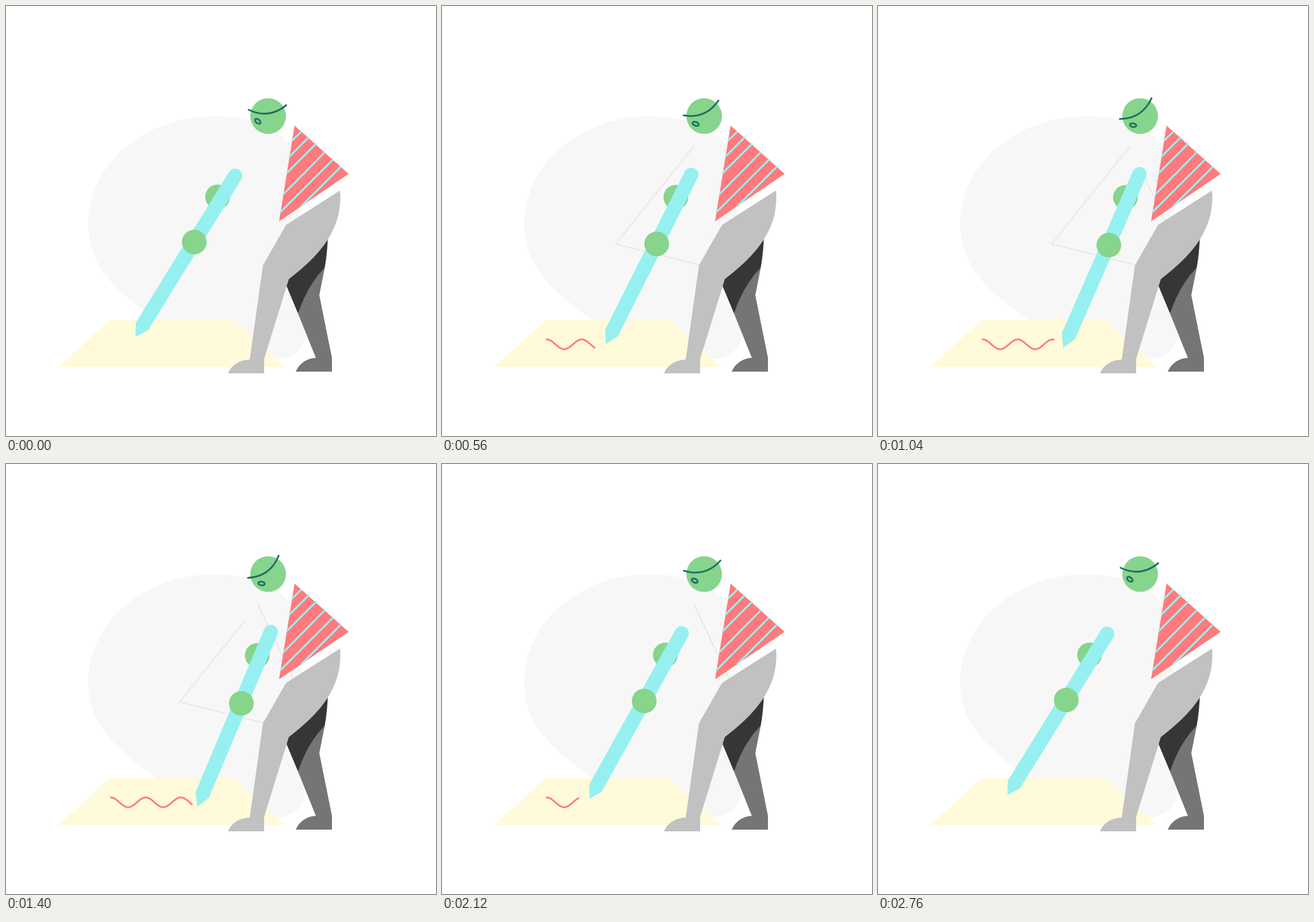
An HTML page that plays this animation: 748x748 px, repeating every 2800 ms.

```html
<!DOCTYPE html>
<html lang="en">
<head>
<meta charset="utf-8">
<title>Giant pencil</title>
<style>
  html, body { margin: 0; width: 100%; height: 100%; overflow: hidden; background: #fff; }
  svg { display: block; width: 100%; height: 100%; }
  .skin { fill: #87d48c; }
  .face { fill: none; stroke: #1f7060; stroke-width: 3; stroke-linecap: round; }
</style>
</head>
<body>
<svg viewBox="0 0 748 748">
  <path fill="#f7f7f7" d="M143 380C143 275 240 192 360 192C440 192 494 220 506 270C518 330 514 440 520 570C521 595 500 613 472 614C400 612 320 590 262 547C200 500 143 460 143 380Z"/>
  <path fill="#fffad9" d="M91 628L180 546.5H397L485 628Z"/>
  <path id="outline" fill="none" stroke="#e5e5e5" stroke-width="1.7" pathLength="1" d="M438 244L302 414L548 475Z"/>

  <!-- legs -->
  <path fill="#757575" d="M554.5 455L545 503L567 612V636H504C510 622 523 613 539 612L508 535L530 455Z"/>
  <path fill="#363636" d="M560 400Q559 430 554.5 455Q524 486 508 535L488 487L492 470L550 400Z"/>
  <path fill="#c1c1c1" d="M581 321L487 381L447 451L424 615C405 616 392 625 386 639H449V614L492 475C532 444 588 396 581 321Z"/>

  <!-- shirt -->
  <path fill="#ff7a7d" d="M502 208L596 292L475 374.5Z"/>
  <path stroke="#99eff0" stroke-width="3.2" d="M498 234L514 218M493 262L527 228M488 291L540 239M483 327L555 254M477 359L569 267M513 349L583 279"/>

  <!-- head -->
  <circle class="skin" cx="456" cy="191.5" r="31"/>
  <g id="face" class="face">
    <path d="M422 180.5Q457 197.5 487.5 172.5"/>
    <ellipse cx="438" cy="200.5" rx="5.6" ry="3.2" transform="rotate(36 438 200.5)"/>
  </g>

  <path id="wave" fill="none" stroke="#ff7a7d" stroke-width="3" stroke-linecap="round" stroke-linejoin="round"/>
  <circle id="backHand" class="skin" r="21.5"/>
  <path id="pencil" fill="#96f0f0" d="M-12.5 0A12.5 12.5 0 0 1 12.5 0V308L0 329.5L-12.5 308Z"/>
  <circle id="frontHand" class="skin" r="21.5"/>
</svg>
<script>
const LOOP = 2800;
const get = id => document.getElementById(id);
const [outline, face, wave, backHand, pencil, frontHand] =
  ['outline', 'face', 'wave', 'backHand', 'pencil', 'frontHand'].map(get);
const clamp = x => Math.min(1, Math.max(0, x));

// cubic-bezier(0, 0, .58, 1)
function easeOut(x) {
  let low = 0, high = 1;
  for (let i = 0; i < 24; i++) {
    const s = (low + high) / 2;
    if (1.74 * s * s * (1 - s) + s ** 3 < x) low = s; else high = s;
  }
  return low * low * (3 - 2 * low);
}

const sineOut = x => Math.sin(clamp(x) * Math.PI / 2);

function wavePath(end) {
  let d = '';
  for (let x = 182; x < end + 1; x++) {
    const px = Math.min(x, end);
    const py = 588.5 - 8.5 * Math.cos(Math.PI * (px - 182) / 30.5);
    d += (d ? 'L' : 'M') + px.toFixed(2) + ' ' + py.toFixed(2);
  }
  return d;
}

function place(node, x, y, angle = 0) {
  node.setAttribute('transform', `translate(${x} ${y}) rotate(${angle})`);
}

function draw(t) {
  const p = t < 1390 ? easeOut(clamp((t - 20) / 1400)) : 1 - easeOut(clamp((t - 1390) / 1400));

  place(pencil, 398.5 + 63 * p, 295.5 - 3.3 * p, 31.75 - 9.05 * p);
  place(backHand, 368 + 70 * p, 332 + p);
  place(frontHand, 327.5 + 83 * p, 410.5 + 6 * p);
  face.setAttribute('transform', `rotate(${-29.3 * p} 455.5 191.5)`);

  // the ink runs ahead early and catches up with the tip at the end
  const ink = p + 1.3 * p * (1 - p) * (0.63 - p);
  wave.setAttribute('d', ink > 0.005 ? wavePath(182 + 144 * ink) : '');

  // the outline is drawn in, then wiped from its start
  const from = sineOut(t / 1360 - 1), to = sineOut(t / 1360);
  outline.setAttribute('stroke-dasharray', `0 ${from} ${to - from} 2`);
  outline.style.visibility = to - from > 0.002 ? 'visible' : 'hidden';
}

function tick() {
  draw(performance.now() % LOOP);
  requestAnimationFrame(tick);
}
tick();
</script>
</body>
</html>
```
